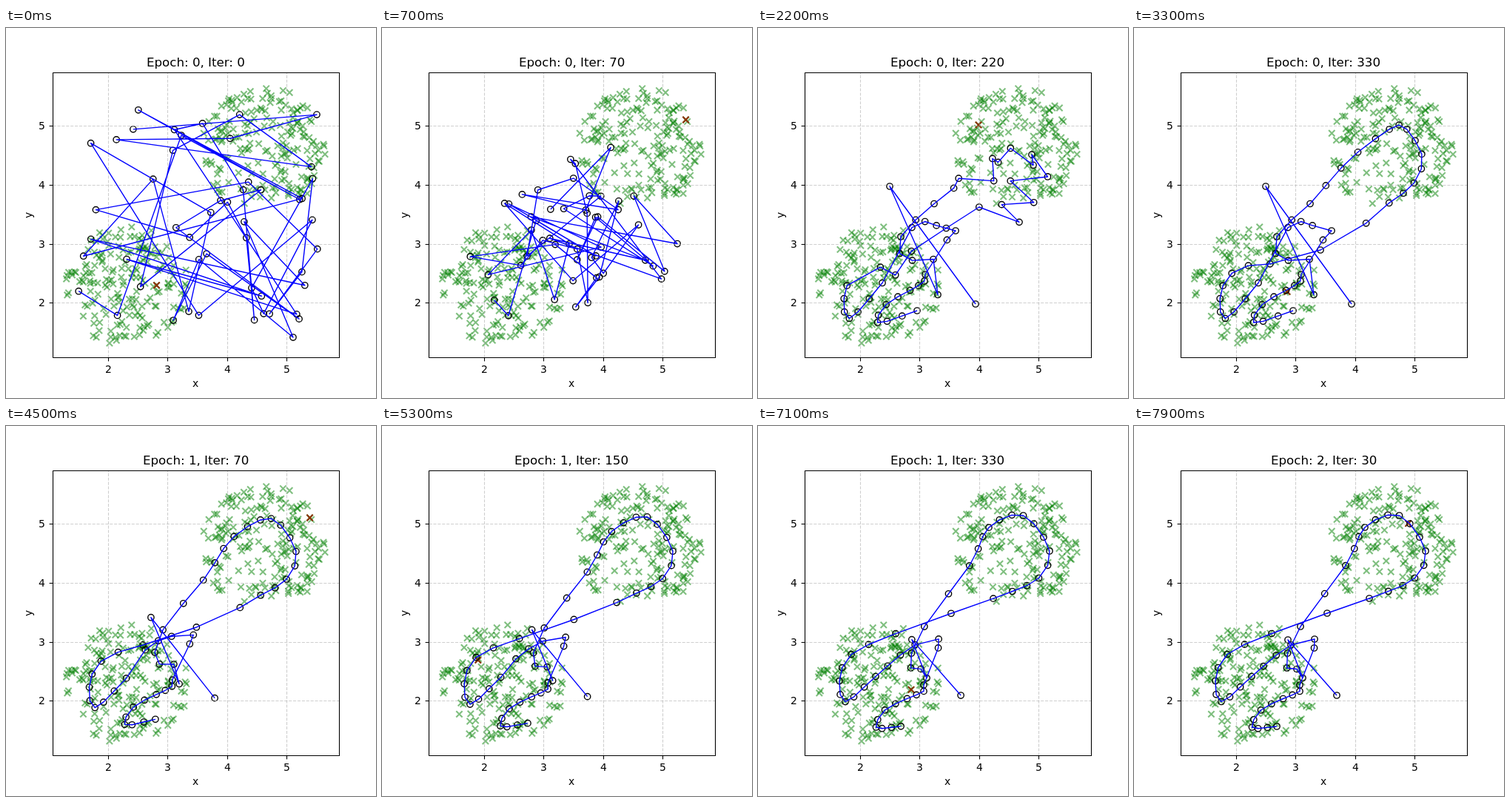
An HTML page with a canvas that plays this animation: 500x500 px, repeating every 8000 ms.

```html
<!DOCTYPE html>
<html lang="en">
<head>
<meta charset="utf-8">
<title>Self-organizing chain</title>
<style>
  html, body { margin: 0; width: 100%; height: 100%; overflow: hidden; background: #fff; }
  canvas { display: block; width: 500px; height: 500px; }
</style>
</head>
<body>
<canvas id="plot" width="500" height="500"></canvas>
<script>
const ctx = document.getElementById('plot').getContext('2d');
const LOOP = 8000, STEP = 100, EPOCH_STEPS = 38, NODES = 50;
const FORMED = 3300, SETTLED = 7900;
const FONT = '"DejaVu Sans", Verdana, sans-serif';
const BOX = { x: 63.5, y: 60.5, w: 387, h: 385 };
const snap = v => Math.round(v) + 0.5;
const tickX = v => snap(138.2 + (v - 2) * 80.2);
const tickY = v => snap(371.4 - (v - 2) * 79.65);

// Key points of the final chain: node number, x, y.
const chainKeys = [
  [1, 193, 406], [4, 159.5, 407], [6, 171.5, 384], [8, 201.5, 368.5], [10, 224, 358.5], [11, 224, 350],
  [12, 243.5, 300], [13, 244, 288], [14, 212, 296], [17, 159, 338.5], [20, 118, 372.5], [22, 110, 344.5],
  [24, 126, 308.5], [26, 186, 280.5], [27, 261, 253], [28, 318, 233], [31, 379.5, 205.5], [33, 394, 169],
  [36, 358.5, 121], [39, 312, 137], [42, 286, 188.5], [44, 225, 271], [45, 207.5, 307], [46, 206.5, 327],
  [47, 220, 328.5], [48, 228, 340.5], [49, 208, 289], [50, 274, 364]
];
// How far the chain still is from that when it first forms: node number, dx, dy.
const slackKeys = [
  [1, 22, -24], [4, 2, -9], [8, 4, -14], [11, 2, -17], [13, 23, -14], [16, 33, -55], [17, 9, 6],
  [25, 5, 26], [27, -9, 47], [29, 1, 13], [34, -6, 2], [38, 0, 23], [42, -48, 49], [44, -32, 11],
  [47, 17, -16], [48, 15, 20], [49, -30, -75], [50, 20, 9]
];

function random(seed) {
  return () => (seed = (seed * 16807) % 2147483647) / 2147483647;
}
const rnd = random(4271);
const between = (a, b) => a + (b - a) * rnd();
const mix = (a, b, k) => a.map((v, i) => v + (b[i] - v) * k);
const easeOut = (p, power) => 1 - Math.pow(1 - Math.min(Math.max(p, 0), 1), power);

// Smooth curve through the keys, read at a node number.
function curve(keys, n) {
  const last = keys.length - 1;
  let i = 0;
  while (i < last - 1 && n > keys[i + 1][0]) i++;
  const a = keys[i], b = keys[i + 1];
  const before = keys[Math.max(i - 1, 0)], after = keys[Math.min(i + 2, last)];
  const span = b[0] - a[0], u = (n - a[0]) / span;
  const slope = (p, q, c) => (q[c] - p[c]) / (q[0] - p[0]) * span;
  return [1, 2].map(c => {
    const m0 = slope(before, b, c), m1 = slope(a, after, c), d = b[c] - a[c];
    return a[c] + u * (m0 + u * (3 * d - 2 * m0 - m1 + u * (m0 + m1 - 2 * d)));
  });
}

const nodes = Array.from({ length: NODES }, (_, i) => {
  const n = i + 1;
  const end = curve(chainKeys, n), slack = curve(slackKeys, n);
  return {
    start: [between(87, 421), between(86, 424)],
    formed: end.map((v, c) => v + slack[c]),
    end,
    arrive: n > 23 && n < 42 ? FORMED : 2200
  };
});

function place(node, t) {
  if (t < FORMED) return mix(node.start, node.formed, easeOut(t / node.arrive, 1.6));
  return mix(node.formed, node.end, easeOut((t - FORMED) / (SETTLED - FORMED), 3));
}

function cloud(cx, cy, r, count) {
  return Array.from({ length: count }, () => {
    const a = between(0, 2 * Math.PI), d = r * Math.sqrt(rnd());
    return [cx + d * Math.cos(a), cy + d * Math.sin(a)];
  });
}
const data = [...cloud(164, 349, 83, 187), ...cloud(348, 164, 85, 187)];

// One sample per step; the order repeats every epoch.
const samples = Array.from({ length: EPOCH_STEPS }, () => data[Math.floor(rnd() * data.length)]);

function line(x1, y1, x2, y2) {
  ctx.beginPath();
  ctx.moveTo(x1, y1);
  ctx.lineTo(x2, y2);
  ctx.stroke();
}

function cross([x, y]) {
  const r = 4.17;
  ctx.beginPath();
  ctx.moveTo(x - r, y - r);
  ctx.lineTo(x + r, y + r);
  ctx.moveTo(x - r, y + r);
  ctx.lineTo(x + r, y - r);
  ctx.stroke();
}

// Centred text that begins on a whole pixel.
function text(str, x, y, size = 13.89) {
  ctx.font = `${size}px ${FONT}`;
  ctx.fillText(str, Math.round(x - ctx.measureText(str).width / 2), y);
}

function drawGrid() {
  ctx.strokeStyle = 'rgba(176, 176, 176, 0.6)';
  ctx.lineWidth = 1.1;
  ctx.setLineDash([4.1, 1.8]);
  for (const v of [2, 3, 4, 5]) {
    line(tickX(v), BOX.y + BOX.h, tickX(v), BOX.y);
    line(BOX.x, tickY(v), BOX.x + BOX.w, tickY(v));
  }
  ctx.setLineDash([]);
}

function drawAxes() {
  ctx.strokeStyle = ctx.fillStyle = '#000';
  ctx.lineWidth = 1.1;
  ctx.strokeRect(BOX.x, BOX.y, BOX.w, BOX.h);
  const bottom = BOX.y + BOX.h;
  for (const v of [2, 3, 4, 5]) {
    const x = tickX(v), y = tickY(v);
    line(x, bottom, x, bottom + 4.9);
    line(BOX.x, y, BOX.x - 4.9, y);
    text(v, x, 466);
    text(v, 48.5, Math.round(y + 4.5));
  }
  text('x', 256.25, 485);
  ctx.save();
  ctx.translate(35, 253);
  ctx.rotate(-Math.PI / 2);
  text('y', 0, 0);
  ctx.restore();
}

function drawChain(points) {
  ctx.lineWidth = 1.39;
  ctx.strokeStyle = '#000';
  for (const [x, y] of points) {
    ctx.beginPath();
    ctx.arc(x, y, 4.17, 0, 2 * Math.PI);
    ctx.stroke();
  }
  drawGrid();
  ctx.strokeStyle = '#00f';
  ctx.lineWidth = 1.39;
  ctx.lineJoin = 'round';
  ctx.beginPath();
  for (const [x, y] of points) ctx.lineTo(x, y);
  ctx.stroke();
}

function draw(step) {
  const epoch = Math.floor(step / EPOCH_STEPS), turn = step % EPOCH_STEPS;
  ctx.fillStyle = '#fff';
  ctx.fillRect(0, 0, 500, 500);
  ctx.lineWidth = 2.08;
  ctx.strokeStyle = 'rgba(0, 128, 0, 0.5)';
  data.forEach(cross);
  ctx.strokeStyle = '#8c3000';
  cross(samples[turn]);
  drawChain(nodes.map(node => place(node, step * STEP)));
  drawAxes();
  text(`Epoch: ${epoch}, Iter: ${turn * 10}`, 256.25, 52, 16.67);
}

const start = performance.now();
let shown = -1;
function tick() {
  const step = Math.floor(((performance.now() - start) % LOOP) / STEP);
  if (step !== shown) draw(shown = step);
  requestAnimationFrame(tick);
}
tick();
</script>
</body>
</html>
```
